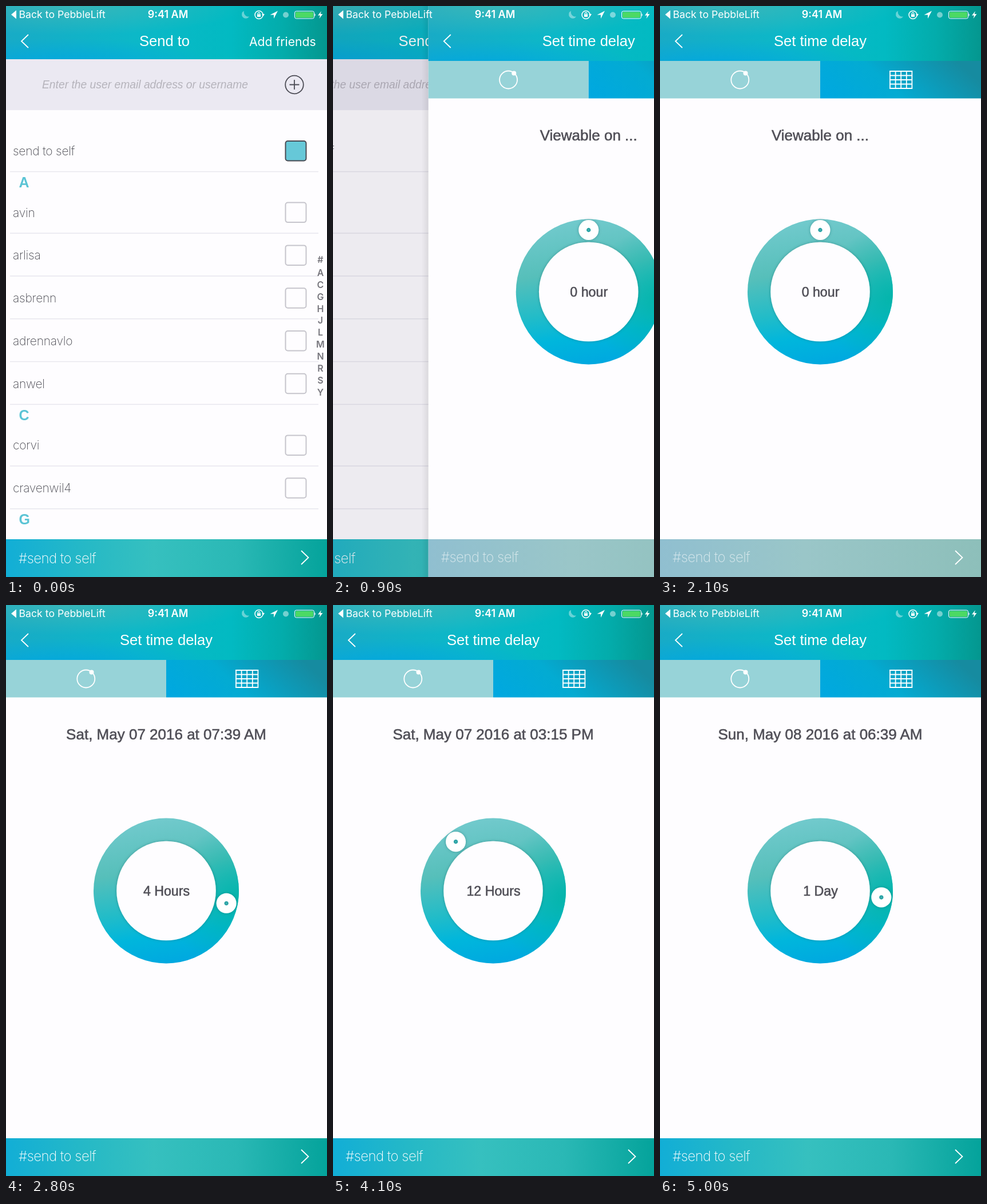
Write an HTML page that moves like this. It is 561x998 px and loops after 5100 ms.

```html
<!DOCTYPE html>
<html lang="en">
<head>
<meta charset="utf-8">
<style>
  html, body { margin: 0; width: 100%; height: 100%; overflow: hidden; background: #fefdff; }
  svg { display: block; }
  text { font-family: "Liberation Sans", Arial, sans-serif; }
  .sys { font-family: Inter, sans-serif; }
  .title { font-size: 25.6px; fill: #fff; text-anchor: middle; }
  .hint { font-size: 19.3px; font-style: italic; fill: #b5b3bb; }
  .row { font: 200 21px Inter, sans-serif; letter-spacing: -.25px; fill: #4a4a52; }
  .foot { font: 200 24px Inter, sans-serif; letter-spacing: -.55px; fill: #fff; }
  .section { font-size: 25px; font-weight: bold; fill: #5bc4d5; }
  .index { font: 600 16px Inter, sans-serif; fill: #77767d; text-anchor: middle; }
  .strong { fill: #504f57; stroke: #504f57; stroke-width: .6px; text-anchor: middle; }
  .line { fill: none; stroke: #fff; stroke-width: 1.8; }
</style>
</head>
<body>
<svg id="stage" width="561" height="998" viewBox="0 0 561 998"></svg>
<script>
const stage = document.getElementById('stage');

const stops = list => list.map(([at, color, alpha = 1]) =>
  `<stop offset="${at}" stop-color="${color}" stop-opacity="${alpha}"/>`).join('');
const linear = (id, [x1, y1, x2, y2], ...list) =>
  `<linearGradient id="${id}" x1="${x1}" y1="${y1}" x2="${x2}" y2="${y2}">${stops(list)}</linearGradient>`;
const radial = (id, [cx, cy, r], color, alpha) =>
  `<radialGradient id="${id}" cx="${cx}" cy="${cy}" r="${r}">${stops([[0, color, alpha], [1, color, 0]])}</radialGradient>`;
const rect = (x, y, w, h, fill, extra = '') =>
  `<rect x="${x}" y="${y}" width="${w}" height="${h}" fill="${fill}" ${extra}/>`;
const circle = (x, y, r, fill, extra = '') =>
  `<circle cx="${x}" cy="${y}" r="${r}" fill="${fill}" ${extra}/>`;
const text = (x, y, kind, value, extra = '') =>
  `<text x="${x}" y="${y}" class="${kind}" ${extra}>${value}</text>`;
const line = (d, extra = '') => `<path class="line" d="${d}" ${extra}/>`;

const header = height => ['sky', 'haze', 'blue'].map(id => rect(0, 0, 561, height, `url(#${id})`)).join('')
  + line('M39 50L27 61.5L39 73');
const footer = (baseline, extra) => text(22, baseline, 'foot', '#send to self', extra)
  + line('M516 952L528.5 964L516 976');

const defs = `<defs>
  ${linear('sky', [0, 0, 1, 0], [0, '#18abc6'], [.4, '#0cb8c8'], [.7, '#02bac2'], [.86, '#03acab'], [1, '#04978f'])}
  ${radial('haze', [.2, 0, .55], '#48b8b4', .7)}
  ${radial('blue', [.16, 1.1, .5], '#00a6e2', .9)}
  ${linear('tab', [0, .85, 1, .6], [0, '#00a8e0'], [.45, '#03abd2'], [1, '#168ba0'])}
  ${linear('bar', [0, 0, 1, 0], [0, '#12aed6'], [.25, '#26b9c6'], [.46, '#36c0bf'], [.72, '#2ab8b5'], [1, '#04a39b'])}
  ${linear('idleBar', [0, 0, 1, 0], [0, '#90bfd0'], [.45, '#9ac6c8'], [1, '#8dbfba'])}
  ${linear('ring', [.4, 0, .55, 1], [0, '#72cacd'], [.35, '#56bfba'], [.62, '#22bcc8'], [.8, '#00b6dc'], [1, '#00a8e0'])}
  ${radial('ringSide', [1, .55, .5], '#00b4a8', .9)}
  ${linear('edge', [0, 0, 1, 0], [0, '#000', 0], [1, '#000', .08])}
  <filter id="soft" x="-20%" y="-20%" width="140%" height="140%">
    <feDropShadow dx="0" dy="0" stdDeviation="2.5" flood-color="#055" flood-opacity=".4"/>
  </filter>
</defs>`;

// Each entry is a section letter or a contact.
function contacts() {
  let y = 289.5, out = '';
  const row = (name, chosen) => text(12, y - 28.5, 'row', name)
    + rect(488.5, y - 53.5, 36, 34.5, chosen ? '#66c8d8' : '#fefdff',
      `rx="4" stroke-width="2" stroke="${chosen ? '#4a4a53' : '#c6c5cc'}"`)
    + rect(7, y - .7, 539, 1.5, '#e8e7ee');
  out += row('send to self', true);
  for (const name of ['A', 'avin', 'arlisa', 'asbrenn', 'adrennavlo', 'anwel', 'C', 'corvi', 'cravenwil4', 'G']) {
    if (name.length === 1) {
      out += text(22.5, y + 27.5, 'section', name);
      y += 32.8;
    } else {
      y += 74.8;
      out += row(name);
    }
  }
  return out;
}

const listPage = `<g id="list">
  ${rect(0, 0, 561, 998, '#fefdff')}
  ${header(93)}
  ${text(277, 70, 'title', 'Send to')}
  ${text(425, 69.5, 'sys', 'Add friends', 'font-size="21.2" fill="#fff"')}
  ${rect(0, 93, 561, 89, '#ebe9f2')}
  ${text(63, 144, 'hint', 'Enter the user email address or username')}
  ${circle(504, 137.5, 15.8, 'none', 'stroke="#4c4c55" stroke-width="1.8"')}
  ${line('M495.5 137.5h17M504 129v17', 'style="stroke:#4c4c55"')}
  ${contacts()}
  ${[...'#ACGHJLMNRSY'].map((c, i) => text(549.5, i ? 450.9 + i * 20.9 : 449, 'index', c)).join('')}
  ${rect(0, 932, 561, 66, 'url(#bar)')}
  ${footer(974)}
  <rect id="dim" width="561" height="998" fill="#150a30" opacity="0"/>
</g>`;

const grid = [0, 1, 2, 3, 4].map(i => `M${402 + i * 9.6} 113v32M401 ${114 + i * 7.5}h40`).join('');

const delayPage = `<g id="delay">
  ${rect(-12, 0, 12, 998, 'url(#edge)')}
  ${rect(0, 0, 561, 998, '#fefdff')}
  ${header(96)}
  ${text(280, 70, 'title', 'Set time delay')}
  ${rect(0, 96, 280, 65.5, '#97d3d8')}
  ${rect(280, 96, 281, 65.5, 'url(#tab)')}
  ${circle(139.8, 129, 15.5, 'none', 'class="line"')}
  ${circle(149.5, 117.5, 4, '#fff')}
  ${line(grid)}
  ${text(280, 235, 'strong', '', 'id="when" font-size="26"')}
  ${circle(280, 499.5, 127, 'url(#ring)')}
  ${circle(280, 499.5, 127, 'url(#ringSide)')}
  ${circle(280, 499.5, 86.8, '#fefdff', 'filter="url(#soft)"')}
  ${text(280.5, 507.7, 'strong', '', 'id="amount" font-size="23.2"')}
  <g id="knob">
    ${circle(0, 0, 17.5, '#fff', 'filter="url(#soft)"')}
    ${circle(0, 0, 2.4, '#5bb', 'stroke="#2ba3a5" stroke-width="2.6"')}
  </g>
  <rect id="bottom" y="932" width="561" height="66"/>
  ${footer(971.5, 'id="recipient"')}
</g>`;

const statusBar = `<g fill="#fff">
  <path d="M9 15L18 7.5V22.5Z"/>
  ${text(22.5, 21.3, 'sys', 'Back to PebbleLift', 'font-size="17.7"')}
  ${text(283, 21.4, 'sys', '9:41 AM', 'font-size="18" font-weight="600" text-anchor="middle"')}
  <path d="M416 8.5A7 7 0 1 0 425 18.5A8 8 0 0 1 416 8.5Z" opacity=".4"/>
  ${circle(442, 15.5, 7, 'none', 'stroke="#fff" stroke-width="1.5"')}
  ${rect(439, 14.5, 6, 4.5, '#fff')}
  ${line('M440.3 15v-2a1.7 1.7 0 0 1 3.4 0v2', 'style="stroke-width:1.2"')}
  <path d="M447 14h5l-2.5 4Z"/>
  <path d="M475 8.5L461.5 15.5H468V22Z"/>
  ${circle(489, 15.5, 5, '#fff', 'opacity=".45"')}
  ${rect(504.5, 9, 34, 13, 'none', 'rx="3" stroke="#fff"')}
  ${rect(506, 10.5, 31, 10, '#4cd964', 'rx="1.5"')}
  <path d="M539.5 13a3 3 0 0 1 0 5ZM551 9L545 16.5H549L547.5 22L553.5 14H549.5Z"/>
</g>`;

stage.innerHTML = defs + listPage + delayPage + statusBar;
const part = Object.fromEntries([...stage.querySelectorAll('[id]')].map(node => [node.id, node]));

const LOOP = 5100, STEP = 100, PUSH = 765.7, TOUCH = 2200;
// Time in ms, knob angle in degrees, chosen delay in hours.
const drag = [[TOUCH, 0, .9], [2800, 102, 4.4], [4100, 322.5, 12], [5000, 456.4, 27.4]];

function dragAt(t) {
  if (t <= TOUCH) return [0, 0];
  const i = Math.max(1, drag.findIndex(key => t <= key[0]));
  const [a, b] = [drag[i - 1], drag[i]];
  const k = (t - a[0]) / (b[0] - a[0]);
  return [1, 2].map(n => a[n] + (b[n] - a[n]) * k);
}

function dateLabel(hours) {
  const date = new Date(Date.UTC(2016, 4, 7, 3, 15 + Math.round(hours * 60)));
  const [day, number, month, year] = date.toUTCString().split(' ');
  const h = date.getUTCHours(), pad = n => String(n).padStart(2, '0');
  return `${day} ${month} ${number} ${year} at ${pad(h % 12 || 12)}:${pad(date.getUTCMinutes())} ${h < 12 ? 'AM' : 'PM'}`;
}

function amountLabel(hours) {
  const n = Math.floor(hours + 1e-6);
  return n >= 24 ? '1 Day' : n ? `${n} Hour${n > 1 ? 's' : ''}` : '0 hour';
}

function draw(t) {
  // Critically damped spring for the page push.
  const s = Math.max(0, t - PUSH) * .01826;
  const left = (1 + s) * Math.exp(-s);
  part.delay.setAttribute('transform', `translate(${t < PUSH ? 600 : 561 * left})`);
  part.list.setAttribute('transform', `translate(${-168.3 * (1 - left)})`);
  part.dim.setAttribute('opacity', .1 * (1 - left));

  const active = t > TOUCH;
  const [angle, hours] = dragAt(t);
  const a = angle * Math.PI / 180;
  part.knob.setAttribute('transform', `translate(${280 + 107.5 * Math.sin(a)} ${499 - 107.5 * Math.cos(a)})`);
  part.when.textContent = active ? dateLabel(hours) : 'Viewable on ...';
  part.amount.textContent = amountLabel(hours);
  part.bottom.setAttribute('fill', active ? 'url(#bar)' : 'url(#idleBar)');
  part.recipient.setAttribute('opacity', active ? 1 : .65);
}

function tick() {
  draw(Math.floor(performance.now() % LOOP / STEP) * STEP);
  requestAnimationFrame(tick);
}
tick();
</script>
</body>
</html>
```
